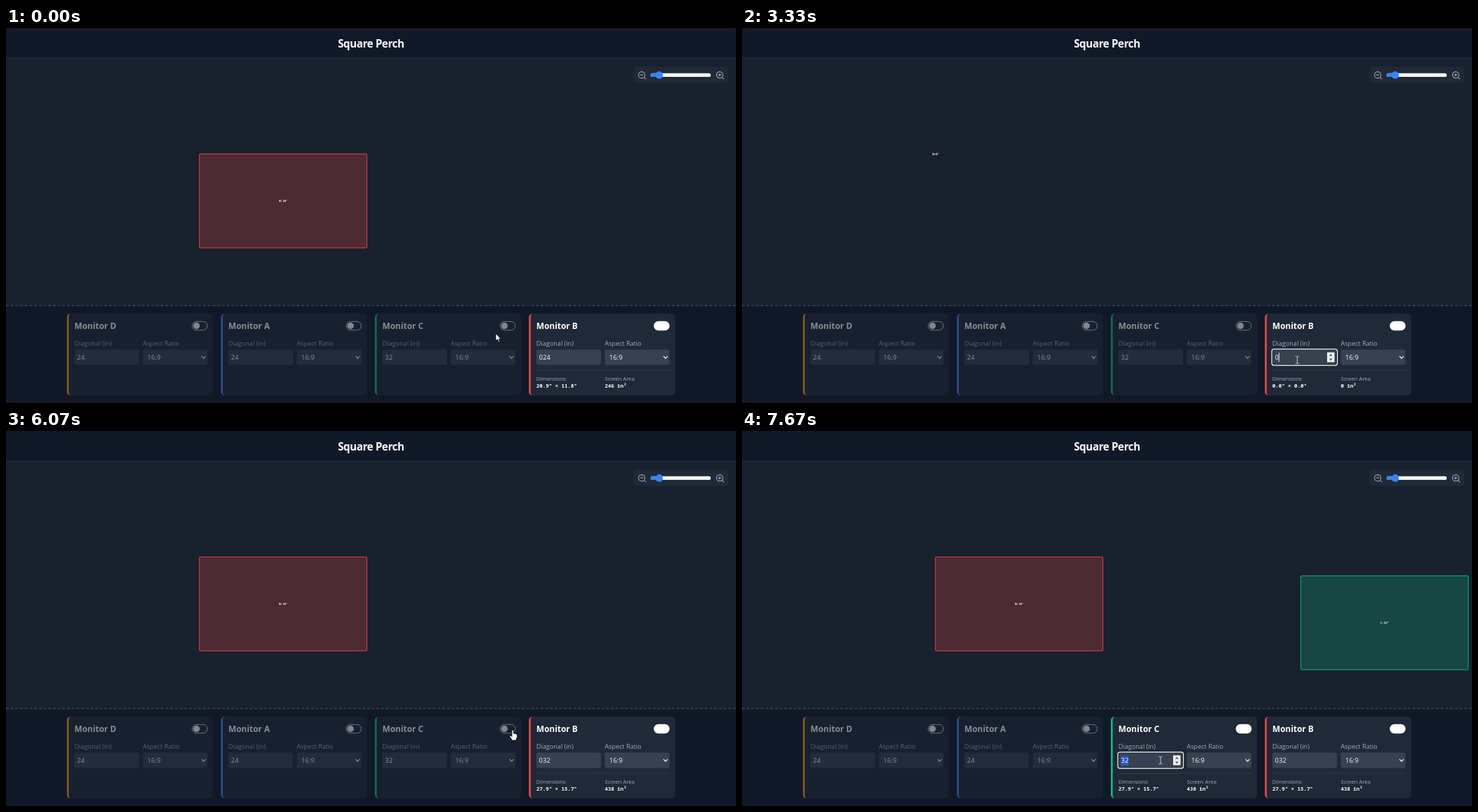
Animation, 1043 px wide and 537 px high, one loop 8 s. Source, as an HTML page:

```html
<!DOCTYPE html>
<html lang="en">
<head>
<meta charset="utf-8">
<title>Square Perch</title>
<style>
  html, body { margin: 0; height: 100%; overflow: hidden; background: #111827; }
  svg { display: block; width: 100vw; height: 100vh; font-family: "Open Sans", "Noto Sans", sans-serif; }
  text { fill: #fff; white-space: pre; }
  .title { font-size: 15.2px; font-weight: 700; letter-spacing: -.4px; text-anchor: middle; }
  .head { font-size: 11.9px; font-weight: 700; }
  .label { font-size: 9.1px; fill: #a5acb8; }
  .value { font-size: 9.5px; }
  .small { font-size: 7.65px; fill: #a5acb8; }
  .mono { font: 600 7.45px "Noto Sans Mono", monospace; }
  .tag { font-size: 4.25px; font-weight: 700; text-anchor: middle; }
  .line { fill: none; stroke-linecap: round; stroke-linejoin: round; }
</style>
</head>
<body>
<svg id="stage" viewBox="0 0 1043 537" preserveAspectRatio="none"></svg>
<script>
const LOOP = 8000, CARD_Y = 409;
const stage = document.getElementById('stage');

// pointer way points: time, x, y
const way = [
  [0, 699.7, 437.5], [270, 722, 429], [400, 722, 429], [470, 723, 429], [670, 723, 429],
  [930, 687, 416], [1200, 730, 444], [1530, 793.3, 475.5], [4800, 793.3, 475.5],
  [5000, 768, 481], [5270, 715.5, 466.5], [5400, 698, 441], [5670, 706, 383],
  [5900, 721, 411], [6070, 724, 428], [6200, 724, 428], [6530, 684, 452],
  [6800, 620, 465.5], [7000, 598, 471.5], [LOOP, 598, 471.5]
];

function pointer(t) {
  const i = Math.max(1, way.findIndex(p => p[0] > t));
  const [t0, x0, y0] = way[i - 1], [t1, x1, y1] = way[i];
  const k = (t - t0) / (t1 - t0);
  return [x0 + (x1 - x0) * k, y0 + (y1 - y0) * k];
}

const text = (x, y, cls, s) => `<text x="${x}" y="${y}" class="${cls}">${s}</text>`;
const rect = (x, y, w, h, r, attrs) =>
  `<rect x="${x}" y="${y}" width="${w}" height="${h}" rx="${r}" ${attrs}/>`;
const path = (d, attrs) => `<path d="${d}" ${attrs}/>`;
const inside = (x, y, x0, y0, x1, y1) => x >= x0 && x <= x1 && y >= y0 && y <= y1;

function monitorsAt(t) {
  const typed = t < 3330 ? '024' : t < 3600 ? '0' : t < 3670 ? '03' : '032';
  const blink = t < 3670 || Math.floor((t - 3670) / 530) % 2 === 0;
  return [
    { name: 'D', x: 87, color: '#f59e0b', value: '24' },
    { name: 'A', x: 307, color: '#3b82f6', value: '24' },
    { name: 'C', x: 527, color: '#10b981', value: '32', on: t >= 6200, box: [798.4, 207.4],
      focus: t >= 7000, selected: t >= 7130 },
    { name: 'B', x: 747, color: '#ef4444', value: typed, on: true, box: [276.4, 180.4],
      focus: t >= 1600 && t < 6070, selected: t >= 1730 && t < 3330,
      caret: t >= 3330 && blink }
  ];
}

function screenBox({ name, value, color, box: [x, y] }) {
  const size = +value, w = size ? 239.2 : .6, h = size ? 134.4 : .6;
  return rect(x, y, w, h, size ? 1.3 : 0,
    `fill="${color}" fill-opacity=".25" stroke="${color}" stroke-opacity=".8" stroke-width="1.2"`) +
    text(x + w / 2, y + h / 2 + 1.5, 'tag', `${name}: ${size}"`);
}

function sizes(inches) {
  const unit = inches / Math.hypot(16, 9), w = 16 * unit, h = 9 * unit;
  return path('M10.8 81H201', 'stroke="#374151" stroke-width=".7"') +
    text(10.8, 96, 'small', 'Dimensions') + text(108.5, 96, 'small', 'Screen Area') +
    text(10.8, 106.2, 'mono', `${w.toFixed(1)}" × ${h.toFixed(1)}"`) +
    text(108.5, 106.2, 'mono', `${Math.round(w * h)} in²`);
}

function card(m, px, py) {
  const hover = m.on && inside(px - m.x, py - CARD_Y, 10.5, 51.5, 103, 73.5);
  const textEnd = 14.5 + 5.43 * m.value.length;
  let s = rect(0, 0, 209, 117, 5.4, 'fill="#1f2937"') +
    path('M5.4 0A5.4 5.4 0 0 0 0 5.4V111.6A5.4 5.4 0 0 0 5.4 117A2.7 5.4 0 0 1 2.7 111.6V5.4A2.7 5.4 0 0 1 5.4 0Z',
      `fill="${m.color}"`) +
    text(10.8, 22, 'head', `Monitor ${m.name}`);
  s += m.on
    ? rect(178.5, 10.8, 22.6, 13.4, 6.7, 'fill="#fff"')
    : rect(179, 11.3, 21.6, 12.4, 6.2, 'fill="none" stroke="#d1d5db"') +
      '<circle cx="185.2" cy="17.5" r="4.7" fill="#f3f4f6"/>';
  s += text(10.8, 46, 'label', 'Diagonal (in)') + text(108.5, 46, 'label', 'Aspect Ratio') +
    rect(10.6, 51.5, 92.4, 22, 2.7, 'fill="#374151"') +
    rect(108.5, 51.5, 92.4, 22, 2.7, 'fill="#374151"');
  if (m.focus) {
    s += rect(11, 51.8, 91.6, 21.4, 2.2, 'fill="none" stroke="#101418"') +
      rect(10, 50.9, 93.6, 23.2, 3, 'fill="none" stroke="#fff" stroke-width="1.2"');
  }
  if (m.selected) s += rect(14.5, 56, textEnd - 14.5, 14, 0, 'fill="#2a55c4"');
  s += text(14.5, 66.3, 'value', m.value) + text(115, 66.3, 'value', '16:9') +
    path('M192.7 61.3L195.3 64L197.9 61.3', 'class="line" stroke="#fff" stroke-width="1.2"');
  if (m.caret && m.focus) s += rect(textEnd - .2, 56, .9, 13, 0, 'fill="#fff"');
  if (m.focus || hover) {
    s += rect(89, 55.5, 10.5, 14, 0, 'fill="#f3f4f6"') +
      path('M89 62.5H99.5', 'stroke="#c4c7cb" stroke-width=".6"') +
      path('M91.6 60.6H96.9L94.25 57.6ZM91.6 64.4H96.9L94.25 67.4Z', 'fill="#565b62"');
  }
  if (m.on) s += sizes(+m.value);
  return `<g transform="translate(${m.x} ${CARD_Y})" opacity="${m.on ? 1 : .5}">${s}</g>`;
}

const lens = (x, sign) =>
  `<g transform="translate(${x} 60.9) scale(.57)" class="line" stroke="#a3abb6" stroke-width="2">` +
  `<circle cx="11" cy="11" r="8"/><path d="M21 21L16.7 16.7${sign}"/></g>`;

const backdrop =
  rect(0, 0, 1043, 537, 0, 'fill="#111827"') +
  rect(0, 43, 1043, 354.5, 0, 'fill="#18212d"') +
  path('M0 43.2H1043', 'stroke="#263a50" stroke-width=".9"') +
  path('M0 397.5H1043', 'stroke="#374a55" stroke-width="1.3" stroke-dasharray="4 2.7"') +
  text(521.5, 28.3, 'title', 'Square Perch') +
  rect(896.5, 55, 135.5, 24, 5.4, 'fill="#1f2937"') +
  lens(902, 'M8 11H14') + lens(1013.4, 'M8 11H14M11 8V14') +
  rect(921, 64.8, 86, 5.2, 2.6, 'fill="#f4f4f4"') +
  rect(921, 64.8, 13, 5.2, 2.6, 'fill="#3b82f6"') +
  '<circle cx="933.3" cy="67.4" r="5.3" fill="#3b82f6"/>';

const solid = 'fill="#fff" stroke="#000" stroke-width=".8" stroke-linejoin="round"';
const shapes = {
  arrow: path('M0 0V10.6L2.5 8.3L4.1 12.2L5.8 11.5L4.2 7.7H7.6Z', solid),
  hand: path('M-1.2 .8Q0 -.8 1.2 .8V5L3 5.2L5 5.8L6.3 7V10.5L5 13V15H-1.5V13.5L-4.5 9.5Q-4.8 7.5 -3 8L-1.2 9.5Z', solid),
  beam: path('M-2.2 -5.5Q0 -5.5 0 -4V4Q0 5.5 -2.2 5.5M2.2 -5.5Q0 -5.5 0 -4M0 4Q0 5.5 2.2 5.5',
    'class="line" stroke="#d5d8dc" stroke-width=".9"')
};

function cursor(monitors, px, py) {
  let kind = 'arrow';
  for (const m of monitors) {
    const x = px - m.x, y = py - CARD_Y;
    if (inside(x, y, 178.5, 10.8, 201, 24.2)) kind = 'hand';
    if (m.on && inside(x, y, 10.5, 51.5, 88.5, 73.5)) kind = 'beam';
  }
  return `<g transform="translate(${px} ${py})">${shapes[kind]}</g>`;
}

let shown = -1;
function draw() {
  // fifteen steps per second
  const t = Math.round(Math.floor((performance.now() % LOOP + 5) * .015) / .15) * 10 % LOOP;
  if (t !== shown) {
    shown = t;
    const monitors = monitorsAt(t), [px, py] = pointer(t);
    stage.innerHTML = backdrop +
      monitors.filter(m => m.on).map(screenBox).join('') +
      monitors.map(m => card(m, px, py)).join('') +
      cursor(monitors, px, py);
  }
  requestAnimationFrame(draw);
}
draw();
</script>
</body>
</html>
```
